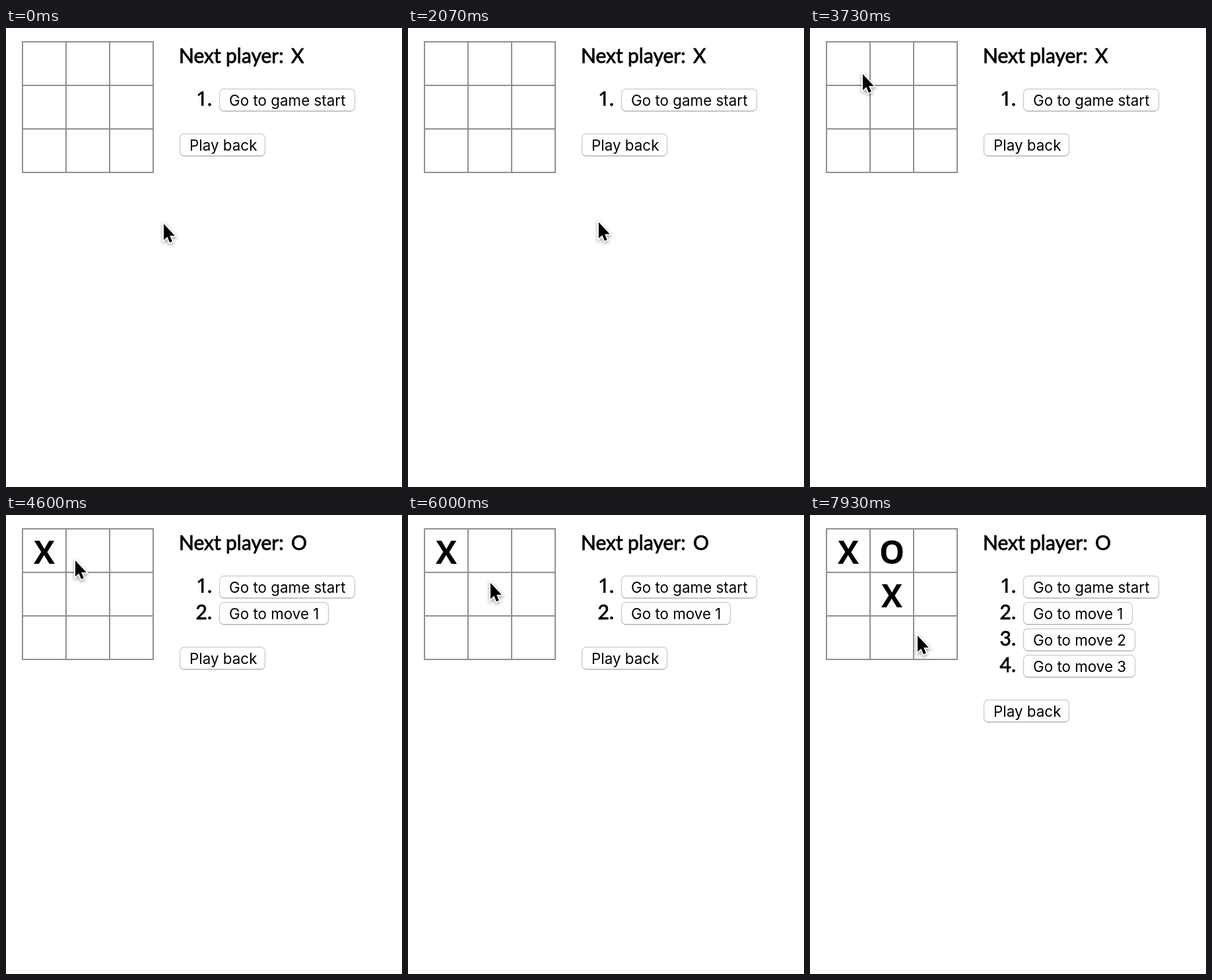
Write an HTML page with a canvas that moves like this. It is 600x696 px and loops after 8000 ms.

```html
<!DOCTYPE html>
<html lang="en">
<head>
<meta charset="utf-8">
<title>Board game</title>
<style>
  html, body { margin: 0; width: 100%; height: 100%; overflow: hidden; background: #fff; }
  canvas { display: block; }
</style>
</head>
<body>
<canvas id="stage" width="600" height="696"></canvas>
<script>
const ctx = document.getElementById('stage').getContext('2d');
const LOOP = 8000;
const STEP = 1000 / 15;
const CELL = 66;
const EDGE = 25;
const ROW = 40;

const HEADING = '30px Lato, sans-serif';
const NUMERAL = '600 30px "Open Sans", sans-serif';
const LABEL = '22.4px Inter, sans-serif';
const MARK = '700 48px "Open Sans", sans-serif';

const arrow = new Path2D('M0 0V24.5L5.4 19.4L9 28.2L12.8 26.6L9.2 18H16.8Z');

// The pointer eases from stop to stop and rests until `leave`; a click marks the cell beneath it.
const stop = (x, y, arrive, leave = arrive, click = false) => ({ x, y, arrive, leave, click });
const stops = [
  stop(239, 297, 0),
  stop(173, 273, 1200, 1400),
  stop(298, 288, 1730, 1800),
  stop(280, 301, 2330, 2400),
  stop(119, 111, 2930),
  stop(80, 70, 3700, 4200, true),
  stop(105, 69, 4600),
  stop(125, 103, 6000),
  stop(122, 62, 6400, 6530, true),
  stop(125, 128, 6900, 7600, true),
  stop(163, 183, 7930, LOOP),
];
const clicks = stops.filter(s => s.click);

const cellOf = v => Math.floor((v - EDGE) / CELL);
const smooth = u => u * u * (3 - 2 * u);
const mix = (a, b, k) => a + (b - a) * k;

function pointerAt(t) {
  const i = stops.findIndex(s => s.leave > t);
  const from = stops[i - 1];
  const to = stops[i];
  const k = smooth(Math.min(1, (t - from.leave) / (to.arrive - from.leave)));
  return [mix(from.x, to.x, k), mix(from.y, to.y, k)];
}

function text(str, x, y, font, align = 'left', weight = 0) {
  ctx.font = font;
  ctx.textAlign = align;
  ctx.fillStyle = ctx.strokeStyle = '#000';
  ctx.fillText(str, x, y);
  if (weight) {
    ctx.lineWidth = weight;
    ctx.strokeText(str, x, y);
  }
}

function heading(str, x, y, align) {
  text(str, x, y, HEADING, align, 0.8);
}

function button(str, x, y, w) {
  const edge = ctx.createLinearGradient(0, y, 0, y + 34);
  edge.addColorStop(0, '#d0d0d0');
  edge.addColorStop(0.85, '#c6c6c6');
  edge.addColorStop(1, '#b0b0b0');
  ctx.beginPath();
  ctx.roundRect(x + 0.5, y + 0.5, w - 1, 33.5, 6.5);
  ctx.fillStyle = '#fff';
  ctx.fill();
  ctx.strokeStyle = edge;
  ctx.lineWidth = 1.3;
  ctx.stroke();
  text(str, x + 15, y + 26, LABEL);
}

function drawBoard(played) {
  ctx.fillStyle = '#909090';
  for (let i = 0; i < 4; i++) {
    ctx.fillRect(24 + i * CELL, 20, 2, 200);
    ctx.fillRect(24, 20 + i * CELL, 200, 2);
  }
  played.forEach(({ x, y }, i) => {
    text('XO'[i % 2], 58 + cellOf(x) * CELL, 74 + cellOf(y) * CELL, MARK, 'center');
  });
}

function drawPanel(count) {
  heading('Next', 262, 53);
  heading('player:', 333, 53);
  heading('XO'[count % 2], 432, 53);

  for (let i = 0; i <= count; i++) {
    const y = 92 + i * ROW;
    heading('.', 312, y + 26, 'right');
    text(i + 1, 305, y + 26, i ? HEADING : NUMERAL, 'right', i ? 0.8 : 0);
    if (i === 0) button('Go to game start', 323, y, 206);
    else button(`Go to move ${i}`, 323, y, i === 1 ? 166 : 170);
  }
  button('Play back', 263, 160 + count * ROW, 130);
}

function drawPointer(x, y) {
  ctx.save();
  ctx.translate(x, y);
  ctx.lineWidth = 3.6;
  ctx.strokeStyle = '#fff';
  ctx.shadowColor = 'rgba(0, 0, 0, 0.4)';
  ctx.shadowBlur = 5;
  ctx.shadowOffsetY = 2;
  ctx.stroke(arrow);
  ctx.shadowColor = 'transparent';
  ctx.fillStyle = '#000';
  ctx.fill(arrow);
  ctx.restore();
}

function draw(now) {
  // Motion advances at 15 steps per second.
  const t = Math.floor((now % LOOP + 3.4) / STEP) * STEP % LOOP;
  const played = clicks.filter(s => s.leave <= t);
  ctx.fillStyle = '#fff';
  ctx.fillRect(0, 0, 600, 696);
  drawBoard(played);
  drawPanel(played.length);
  drawPointer(...pointerAt(t));
}

const start = performance.now();
function tick() {
  draw(performance.now() - start);
  requestAnimationFrame(tick);
}
tick();
</script>
</body>
</html>
```
